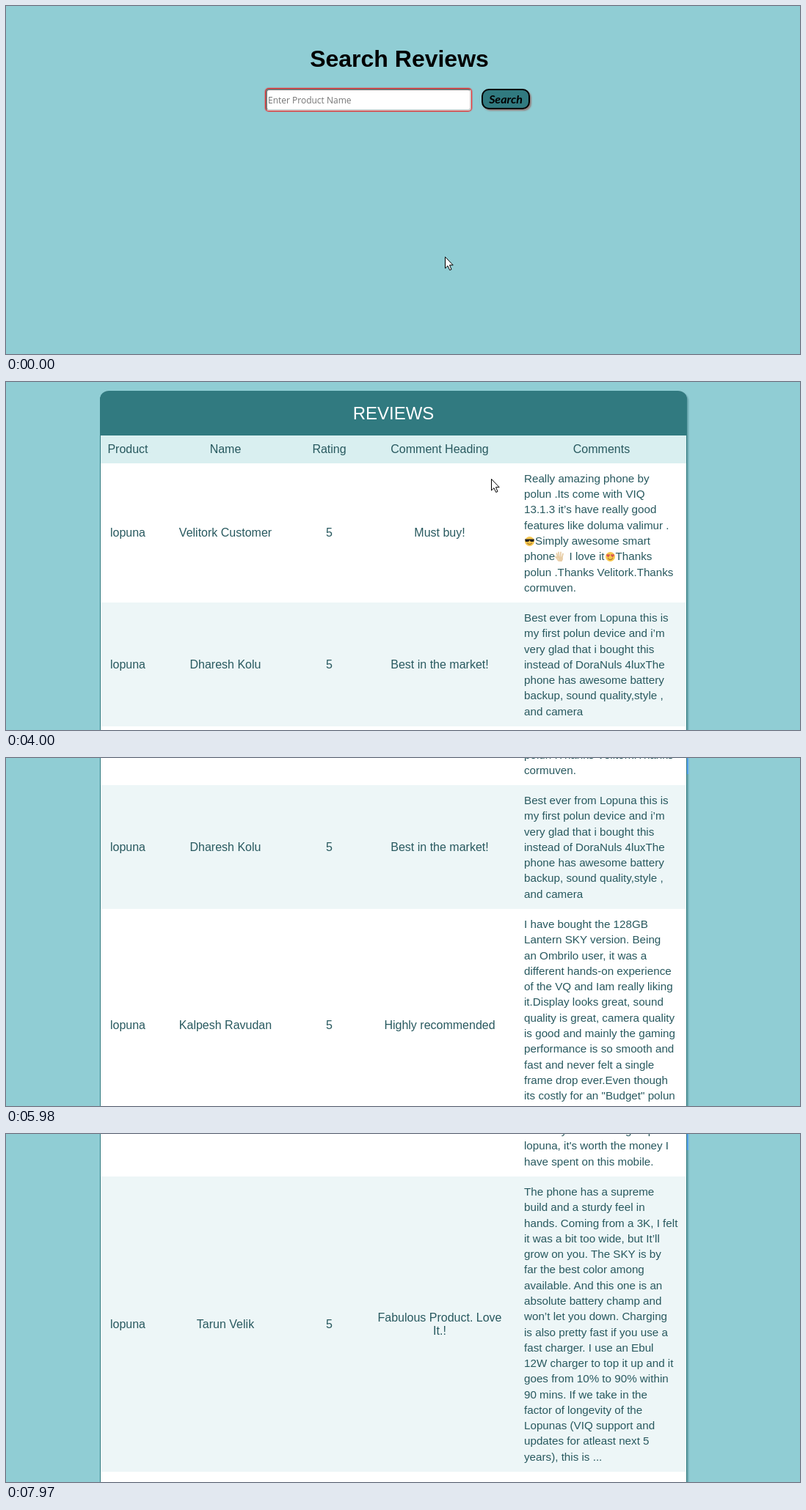
An HTML page for the animation above (8 s loop, 1082 by 475 pixels).

```html
<!DOCTYPE html>
<html lang="en">
<head>
<meta charset="utf-8">
<title>Search Reviews</title>
<style>
html, body { margin: 0; width: 100%; height: 100%; overflow: hidden; background: #90cdd4; }
body { position: relative; font: 16px "Liberation Sans", Arial, sans-serif; }
div, svg.pointer { position: absolute; box-sizing: border-box; }
[hidden] { display: none !important; }
#search, #results { inset: 0; }
h1 { position: absolute; left: 0; top: 54px; width: 1072px; margin: 0; font-size: 32px; line-height: 37px; text-align: center; }
#field { left: 354px; top: 113px; width: 280px; height: 30px; border: 2px inset #ccc; border-radius: 4px; background: #fff; }
#field.empty { box-shadow: 0 0 1.5px 1px red; }
#entry, #popup { font: 12px/17px "Open Sans", sans-serif; white-space: pre; }
#entry { left: 357px; top: 120px; }
#entry.empty { color: #757575; }
#caret { top: 120px; width: 1px; height: 16px; background: #000; }
#popup { left: 353px; top: 145px; width: 283px; height: 22px; padding: 2px 3px; border: 1px solid #bbb; background: #fff; }
#go { left: 648px; top: 113px; width: 66px; height: 28px; border: 2px solid #000; border-radius: 10px; background: #317a80;
  box-shadow: 2px 2px 2px #94807f; font: italic 700 16px/24px Lato, sans-serif; text-align: center; }
#table { left: 128px; top: 12px; width: 800px; height: 1300px; border: solid #317a80; border-width: 0 1px; border-radius: 12px 12px 0 0;
  background: #fff; color: #28595f; box-shadow: 2px 2px 2px rgba(0, 60, 70, .3); }
#caption { left: -1px; top: 0; width: 800px; height: 61px; border-radius: 12px 12px 0 0; background: #317a80; color: #fff;
  font-size: 24px; line-height: 62px; text-align: center; }
.row { left: 0; width: 798px; display: grid; grid-template-columns: 74px 192px 91px 210px 231px; align-items: center; text-align: center; white-space: pre; line-height: 18px; }
.head { background: #d9eff0; }
.even { background: #edf6f7; }
.row p { margin: 0; padding-left: 10px; font-size: 15.2px; line-height: 21.28px; text-align: left; }
.emoji { width: 15px; height: 15px; vertical-align: -3px; }
#edge { left: 928px; top: 0; width: 2px; height: 22px; background: linear-gradient(90deg, #3f8ee0, #72b8ff); }
.pointer { left: 0; top: 0; overflow: visible; }
</style>
</head>
<body>
<div id="search">
  <h1>Search Reviews</h1>
  <div id="field"></div>
  <div id="entry"></div>
  <div id="caret"></div>
  <div id="popup">lopuna</div>
  <div id="go">Search</div>
</div>
<div id="results">
  <div id="table"><div id="caption">REVIEWS</div></div>
  <div id="edge"></div>
</div>
<svg class="pointer" id="arrow" width="12" height="19"><path d="M.5 .5V16L4 12.7L6.7 18.5L9 17.5L6.5 11.7H11.2Z" fill="#fff" stroke="#000"/></svg>
<svg class="pointer" id="beam" width="7" height="16"><path d="M0 .5H2.5L3.5 1.5L4.5 .5H7M3.5 1V15M0 15.5H2.5L3.5 14.5L4.5 15.5H7" fill="none" stroke="#111"/></svg>
<script>
const $ = id => document.getElementById(id);
const emoji = shapes => `<svg class="emoji" viewBox="0 0 15 15">${shapes}</svg>`;
const face = '<circle cx="7.5" cy="7.5" r="6.5" fill="#f6c64d"/><path d="M4 9.5Q7.5 13.5 11 9.5" fill="none" stroke="#8a5a20"/>';
const heart = '<path d="M4.5 8.5L2 5.5Q3 3 4.5 4.7Q6 3 7 5.5Z" fill="#d9564f"/>';
const shades = emoji(face + '<path d="M1 4.5H14L13 8H9L7.5 6L6 8H2Z" fill="#222"/>');
const loving = emoji(face + heart + `<g transform="translate(6)">${heart}</g>`);
const hand = emoji('<path d="M5 13L1.5 8L4 8.5L2.5 3M5.5 8L5 1.5M7.5 8L8 1.5M9.5 9L11 3.5" stroke="#e8cda6" stroke-width="1.8" stroke-linecap="round" fill="none"/><path d="M3.5 7.5H10.5L11 11L9.5 14H6Z" fill="#e8cda6"/>');

const reviews = [
  ["Velitork Customer", "Must buy!", 190, `Really amazing phone by
polun .Its come with VIQ
13.1.3 it’s have really good
features like doluma valimur .
${shades}Simply awesome smart
phone${hand} I love it${loving}Thanks
polun .Thanks Velitork.Thanks
cormuven.`],
  ["Dharesh Kolu", "Best in the market!", 169, `Best ever from Lopuna this is
my first polun device and i’m
very glad that i bought this
instead of DoraNuls 4luxThe
phone has awesome battery
backup, sound quality,style ,
and camera`],
  ["Kalpesh Ravudan", "Highly recommended", 318, `I have bought the 128GB
Lantern SKY version. Being
an Ombrilo user, it was a
different hands-on experience
of the VQ and Iam really liking
it.Display looks great, sound
quality is great, camera quality
is good and mainly the gaming
performance is so smooth and
fast and never felt a single
frame drop ever.Even though
its costly for an "Budget" polun
lopuna, it's worth the money I
have spent on this mobile.`],
  ["Tarun Velik", "Fabulous Product. Love\nIt.!", 403, `The phone has a supreme
build and a sturdy feel in
hands. Coming from a 3K, I felt
it was a bit too wide, but It’ll
grow on you. The SKY is by
far the best color among
available. And this one is an
absolute battery champ and
won’t let you down. Charging
is also pretty fast if you use a
fast charger. I use an Ebul
12W charger to top it up and it
goes from 10% to 90% within
90 mins. If we take in the
factor of longevity of the
Lopunas (VIQ support and
updates for atleast next 5
years), this is ...`]
];

let rowTop = 61;
function addRow(kind, height, cells) {
  $("table").insertAdjacentHTML("beforeend",
    `<div class="row ${kind}" style="top:${rowTop}px;height:${height}px">${cells.join("")}</div>`);
  rowTop += height;
}
const span = text => `<span>${text}</span>`;
addRow("head", 38, ["Product", "Name", "Rating", "Comment Heading", "Comments"].map(span));
reviews.forEach(([name, heading, height, comment], i) =>
  addRow(i % 2 ? "even" : "", height, [...["lopuna", name, 5, heading].map(span), `<p>${comment}</p>`]));

// Each list holds [start time, value] pairs; a value holds until the next one.
const at = (steps, t) => steps.filter(s => s[0] <= t).pop()[1];
const typed = [[0, ""], [2520, "lo"], [3010, "lopuna"]];
const caretX = [[0, 0], [1000, 357], [1510, 0], [2010, 357], [2520, 367], [3010, 395], [3500, 0]];
const arrowAt = [[0, [598, 342]], [500, null], [4000, [661, 132]], [4500, [784, 121]], [4990, null]];
const beamAt = [[0, null], [500, [449, 119]], [1000, [448, 117]], [2520, null]];
const scrolled = [[0, 0], [4990, 61], [5480, 162], [5980, 264], [6480, 350], [6990, 436], [7480, 583], [7970, 730]];

function place(id, pos) {
  $(id).style.display = pos ? "" : "none";
  if (pos) $(id).style.transform = `translate(${pos[0]}px,${pos[1]}px)`;
}

function draw() {
  const t = performance.now() % 8000;
  const text = at(typed, t), x = at(caretX, t);
  $("search").hidden = t >= 4000;
  $("results").hidden = t < 4000;
  $("entry").textContent = text || "Enter Product Name";
  $("entry").className = $("field").className = text ? "" : "empty";
  $("popup").hidden = !text;
  $("caret").hidden = !x;
  $("caret").style.left = x + "px";
  $("table").style.transform = `translateY(${-at(scrolled, t)}px)`;
  $("edge").hidden = t < 4990;
  place("arrow", at(arrowAt, t));
  place("beam", at(beamAt, t));
  requestAnimationFrame(draw);
}
draw();
</script>
</body>
</html>
```
